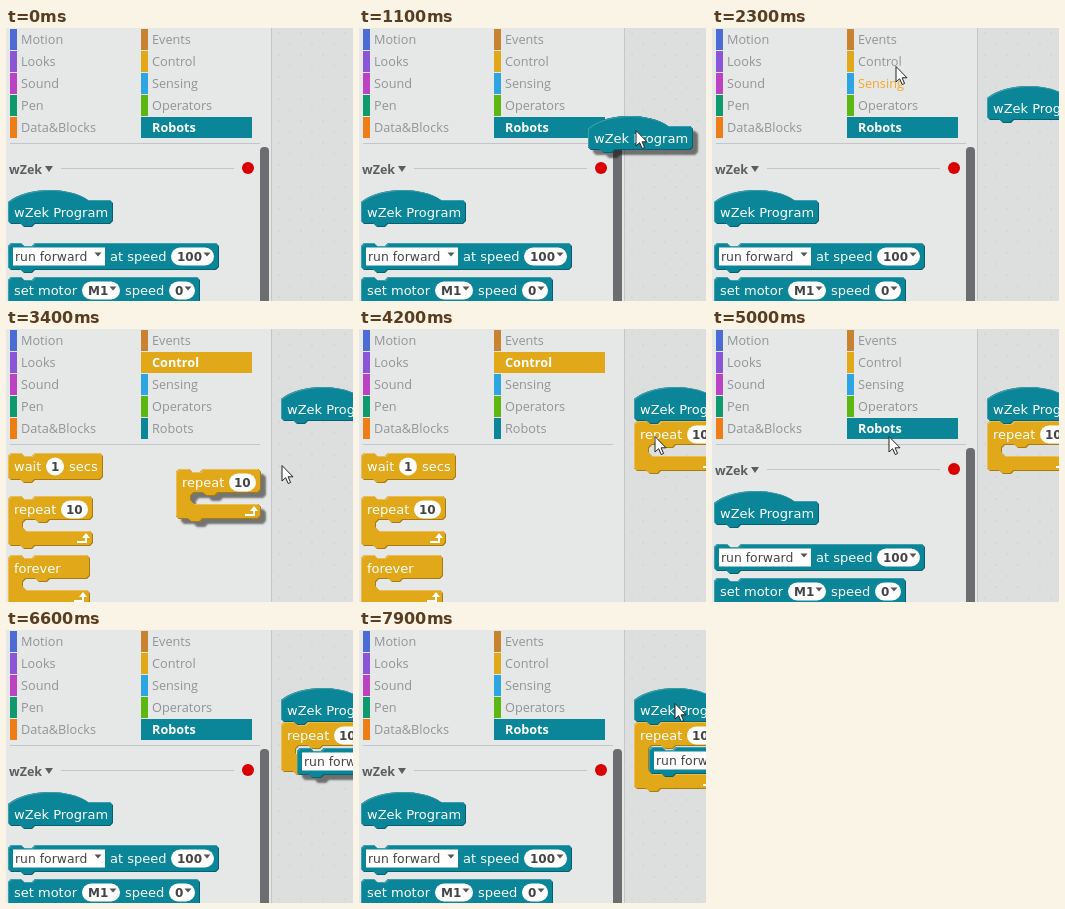
An HTML page with a canvas for the animation above (8 s loop, 347 px wide and 273 px high).

```html
<!DOCTYPE html>
<html lang="en">
<head>
<meta charset="utf-8">
<title>Block editor</title>
<style>
  html, body { margin: 0; width: 100%; height: 100%; overflow: hidden; }
  canvas { display: block; width: 347px; height: 273px; }
</style>
</head>
<body>
<canvas></canvas>
<script>
const W = 347, H = 273, LOOP = 8000, STEP = 100;
const canvas = document.querySelector('canvas');
const ctx = canvas.getContext('2d');
const scale = window.devicePixelRatio || 1;
canvas.width = W * scale;
canvas.height = H * scale;

const BLOCK_FONT = '13px "DejaVu Sans", sans-serif';
const MENU_FONT = '12.4px "DejaVu Sans", sans-serif';
const VALUE_FONT = 'bold 12px "DejaVu Sans", sans-serif';
const LABEL_FONT = '12.7px "Open Sans", sans-serif';
const TEAL = { base: '#0a8698', light: '#3a9eac', dark: '#07606d' };
const GOLD = { base: '#e1a91a', light: '#e9bf55', dark: '#a67c12' };
const ROW = 22, GAP = 5, ARM = 15, MOUTH = 11;

const categories = [
  ['Motion', '#4a6cd4'], ['Looks', '#8a55d7'], ['Sound', '#bb42c3'],
  ['Pen', '#0e9a6c'], ['Data&Blocks', '#ee7d16'],
  ['Events', '#c88330'], ['Control', '#e1a91a'], ['Sensing', '#2ca5e2'],
  ['Operators', '#5cb712'], ['Robots', '#0a8698']
].map(([name, color], i) => ({
  name, color, x: i < 5 ? 4 : 135, y: 1 + (i % 5) * ROW, labelX: i < 5 ? 15 : 146
}));

// How each kind of part sets its text
const partStyles = {
  label: { font: BLOCK_FONT, before: 0, after: 0 },
  box: { font: MENU_FONT, before: 2, after: 18 },
  menu: { font: VALUE_FONT, before: 6, after: 12 },
  oval: { font: VALUE_FONT, before: 5, after: 5 }
};
const part = kind => string => ({ kind, string, ...partStyles[kind] });
const [label, box, menu, oval] = Object.keys(partStyles).map(part);

// Lays the parts out from left to right and fits the block around them
function makeBlock(shape, color, ...parts) {
  let x = parts[0].kind === 'label' ? 6 : GAP;
  for (const p of parts) {
    ctx.font = p.font;
    p.x = x;
    p.w = Math.round(ctx.measureText(p.string).width + p.before + p.after);
    x += p.w + GAP;
  }
  return {
    shape, color, parts,
    w: shape === 'loop' ? Math.max(x, 82) : x,
    h: { hat: 34, command: 27, loop: 24 }[shape],
    mid: shape === 'hat' ? 22.5 : 13.5
  };
}

const blocks = {
  program: makeBlock('hat', TEAL, label('wZek Program')),
  run: makeBlock('command', TEAL, box('run forward'), label('at speed'), menu('100')),
  motor: makeBlock('command', TEAL, label('set motor'), menu('M1'), label('speed'), menu('0')),
  wait: makeBlock('command', GOLD, label('wait'), oval('1'), label('secs')),
  repeat: makeBlock('loop', GOLD, label('repeat'), oval('10')),
  forever: makeBlock('loop', GOLD, label('forever'))
};

const PALETTE_X = 2;
const palettes = {
  Robots: { program: 162, run: 215, motor: 249 },
  Control: { wait: 124, repeat: 167, forever: 226 }
};
const homeY = { ...palettes.Robots, ...palettes.Control };

// The pointer's stops: [time, x, y]
const stops = [
  [200, 321, 78], [700, 30, 176],                     // to the program block
  [1000, 257, 102], [1100, 277, 102], [1300, 303, 72],
  [2000, 316, 73], [2300, 184, 38], [2500, 172, 36],  // to the Control category
  [2700, 172, 36], [3100, 24, 177],                   // to the repeat block
  [3400, 276, 136], [3600, 296, 107],
  [4200, 296, 107], [4500, 177, 107],                 // to the Robots category
  [5500, 177, 107], [5930, 91, 216],                  // to the run block
  [6100, 311, 172], [6500, 380, 119],
  [7500, 380, 108], [7900, 316, 73]
];
const drags = [
  { name: 'program', grab: 700, drop: 1500 },
  { name: 'repeat', grab: 3100, drop: 4000 },
  { name: 'run', grab: 5930, drop: 6900 }
];
const dropTime = Object.fromEntries(drags.map(d => [d.name, d.drop]));

function pointerAt(t) {
  const next = Math.max(1, stops.findIndex(s => s[0] > t));
  if (t >= stops.at(-1)[0]) return stops.at(-1).slice(1);
  const [t0, x0, y0] = stops[next - 1], [t1, x1, y1] = stops[next];
  const k = Math.max(0, (t - t0) / (t1 - t0));
  return [Math.round(x0 + (x1 - x0) * k), Math.round(y0 + (y1 - y0) * k)];
}

function rect(x, y, w, h, color, r = 0) {
  ctx.fillStyle = color;
  ctx.beginPath();
  ctx.roundRect(x, y, w, h, r);
  ctx.fill();
}

function polygon(color, ...points) {
  ctx.fillStyle = color;
  ctx.beginPath();
  points.forEach(p => ctx.lineTo(...p));
  ctx.closePath();
  ctx.fill();
}

function text(string, x, y, font, color) {
  ctx.font = font;
  ctx.fillStyle = color;
  ctx.fillText(string, x, y);
}

function outline({ w, h, shape }, gap) {
  const p = new Path2D();
  const line = (...points) => points.forEach(([x, y]) => p.lineTo(x, y));
  const underside = (y, x) => line([w, y - 3], [w - 3, y], [x + 27, y], [x + 24, y + 3],
    [x + 16, y + 3], [x + 13, y], [x + 3, y]);
  if (shape === 'hat') {
    p.moveTo(0, 12);
    p.bezierCurveTo(18, -3, 60, -4, 80, 10);
    line([w - 3, 10], [w, 13]);
  } else {
    p.moveTo(0, 3);
    line([3, 0], [13, 0], [16, 3], [24, 3], [27, 0], [w - 3, 0], [w, 3]);
  }
  let bottom = h;
  if (shape === 'loop') {
    underside(h, ARM);
    bottom += gap;
    line([ARM, h + 3], [ARM, bottom - 3], [ARM + 3, bottom], [w - 3, bottom], [w, bottom + 3]);
    bottom += ARM;
  }
  underside(bottom, 0);
  line([0, bottom - 3]);
  p.closePath();
  return p;
}

function drawPart({ kind, string, x, w, font, before }, mid) {
  const baseline = mid + 4.5;
  if (kind === 'label') return text(string, x, baseline, font, '#fff');
  rect(x, mid - 9, w, 18, '#fff', kind === 'box' ? 0 : 9);
  text(string, x + before, baseline, font, '#444');
  if (kind === 'oval') return;
  const tip = x + w - 7;
  polygon('#555', [tip - 3.5, mid - 4], [tip + 3.5, mid - 4], [tip, mid]);
}

function drawLoopArrow(x, y) {
  ctx.strokeStyle = '#fff';
  ctx.lineWidth = 2;
  ctx.beginPath();
  ctx.moveTo(x, y + 9);
  ctx.lineTo(x + 9, y + 9);
  ctx.lineTo(x + 9, y + 4);
  ctx.stroke();
  polygon('#fff', [x + 5, y + 5], [x + 9, y], [x + 13, y + 5]);
}

function drawBlock(name, x, y, { lifted = false, gap = MOUTH } = {}) {
  const block = blocks[name], { base, light, dark } = block.color;
  const path = outline(block, gap);
  const fill = (color, d) => {
    ctx.translate(d, d);
    ctx.fillStyle = color;
    ctx.fill(path);
    ctx.translate(-d, -d);
  };
  ctx.save();
  ctx.translate(x, y);
  if (lifted) {
    ctx.save();
    ctx.shadowColor = 'rgba(0,0,0,.5)';
    ctx.shadowOffsetX = ctx.shadowOffsetY = 5 * scale;
    ctx.shadowBlur = 2 * scale;
    fill(dark, 0);
    ctx.restore();
  }
  // Bevel: dark lower right edge, light upper left edge
  ctx.save();
  fill(dark, 0);
  ctx.clip(path);
  ctx.translate(-1, -1);
  ctx.clip(path);
  fill(light, 0);
  fill(base, 2);
  ctx.restore();

  block.parts.forEach(p => drawPart(p, block.mid));
  if (block.shape === 'loop') drawLoopArrow(block.w - 16, block.h + gap + 2);
  ctx.restore();
}

function drawWorkspace(t) {
  rect(265, 0, W - 265, H, '#dddede');
  for (let row = 0; row * 11 < H; row++)
    for (let x = 272 + (row % 2) * 11; x < W; x += 22)
      rect(x, 4 + row * 11, 2, 2, '#d6d7d7');
  rect(265, 0, 1, H, '#c3c5c6');

  const left = 275, top = 58, loopTop = top + blocks.program.h;
  const nested = t >= dropTime.run;
  if (t >= dropTime.program) drawBlock('program', left, top);
  if (t >= dropTime.repeat)
    drawBlock('repeat', left, loopTop, { gap: nested ? blocks.run.h + 1 : MOUTH });
  if (nested) drawBlock('run', left + ARM, loopTop + blocks.repeat.h + 1);
}

function drawCategories(t, selected) {
  const [px, py] = pointerAt(t - STEP);
  for (const { name, color, x, y, labelX } of categories) {
    const active = name === selected;
    const hovered = px >= x && px < x + 111 && py >= y && py < y + ROW;
    rect(x, y, active ? 111 : 7, 21, color);
    text(name, labelX, y + 15, (active ? 'bold ' : '') + LABEL_FONT,
      active ? '#fff' : hovered ? '#f5a623' : '#919496');
  }
}

function drawRobotHeader() {
  rect(254, 119, 9, H, '#6c6d70', 4);
  text('wZek', 3, 145.5, 'bold 12.5px "Open Sans", sans-serif', '#5c5d5f');
  polygon('#5c5d5f', [39, 138], [47, 138], [43, 144]);
  rect(55, 140, 173, 1, '#c3c6c7');
  rect(236, 134, 12, 12, '#d90000', 6);
}

function drawPalette(t) {
  const selected = t >= 2500 && t < 4800 ? 'Control' : 'Robots';
  rect(0, 0, 265, H, '#e6e8e8');
  drawCategories(t, selected);
  rect(4, 115, 250, 1, '#c3c6c7');
  if (selected === 'Robots') drawRobotHeader();
  for (const [name, y] of Object.entries(palettes[selected])) drawBlock(name, PALETTE_X, y);
}

// A held block trails the pointer by one step
function drawHeldBlock(t) {
  const held = drags.find(d => t - STEP > d.grab && t < d.drop);
  if (!held) return;
  const [x, y] = pointerAt(t - STEP), [grabX, grabY] = pointerAt(held.grab);
  drawBlock(held.name, PALETTE_X + x - grabX, homeY[held.name] + y - grabY, { lifted: true });
}

function drawPointer(x, y) {
  ctx.save();
  ctx.translate(x, y + .5);
  polygon('#fff', [0, 0], [0, 15.5], [3.6, 12.2], [6.2, 18], [8.6, 17], [6.1, 11.3], [11, 11.3]);
  ctx.strokeStyle = '#222';
  ctx.lineWidth = 1;
  ctx.stroke();
  ctx.restore();
}

function render(t) {
  ctx.setTransform(scale, 0, 0, scale, 0, 0);
  drawWorkspace(t);
  drawPalette(t);
  drawHeldBlock(t);
  if (t >= stops[0][0]) drawPointer(...pointerAt(t));
}

const start = performance.now();
function tick() {
  const elapsed = (performance.now() - start) % LOOP;
  render(Math.floor(elapsed / STEP) * STEP);
  requestAnimationFrame(tick);
}
tick();
</script>
</body>
</html>
```
